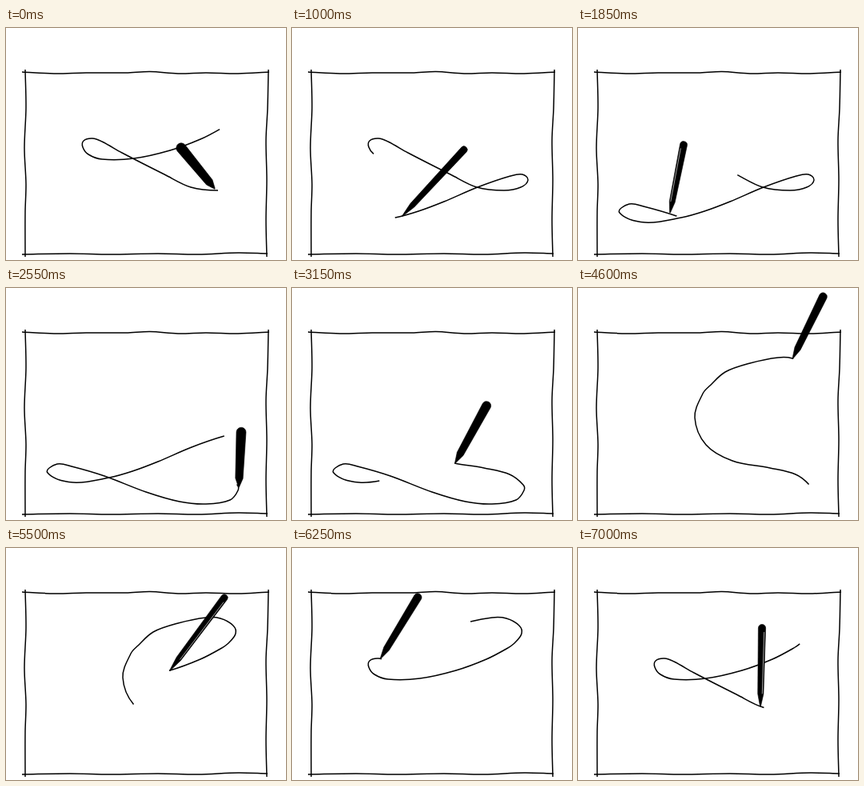
Write an HTML page that moves like this. It is 350 px wide and 290 px high and loops after 7.05 s.

```html
<!DOCTYPE html>
<html lang="en">
<head>
<meta charset="utf-8">
<title>Drawing pen</title>
<style>
html, body { margin: 0; width: 100%; height: 100%; overflow: hidden; background: #fff; }
svg { display: block; width: 350px; height: 290px; }
.line { fill: none; stroke: #000; stroke-width: 1.5; stroke-linejoin: round; }
</style>
</head>
<body>
<svg viewBox="0 0 350 290">
  <g id="border"></g>
  <path id="trail" class="line"/>
  <path id="pen" stroke="#000" stroke-width=".6" stroke-linejoin="round"/>
  <path id="shine" fill="none" stroke="#fff" stroke-width=".8"/>
</svg>
<script>
const LOOP = 7050, STEP = 50, PERIOD = 7080, TRAIL_TIME = 2050;
const el = id => document.getElementById(id);
const trail = el('trail'), pen = el('pen'), shine = el('shine');

// Smooth path through points; a closed one is cut after `count` segments.
function spline(pts, closed, count) {
  const n = pts.length;
  const at = i => closed ? pts[(i + n) % n] : pts[Math.max(0, Math.min(n - 1, i))];
  const segments = count ?? (closed ? n : n - 1);
  let d = 'M' + pts[0];
  for (let i = 0; i < segments; i++) {
    const [a, b, c, e] = [at(i - 1), at(i), at(i + 1), at(i + 2)];
    const k = Math.hypot(c[0] - b[0], c[1] - b[1]) / 3;
    const handle = (p, q, s) => {
      const len = Math.hypot(q[0] - p[0], q[1] - p[1]) || 1;
      return [0, 1].map(j => (q[j] - p[j]) / len * k * s);
    };
    const h1 = handle(a, c, 1), h2 = handle(b, e, -1);
    d += `C${b[0] + h1[0]},${b[1] + h1[1]} ${c[0] + h2[0]},${c[1] + h2[1]} ${c}`;
  }
  return d;
}

// Periodic monotone cubic through [time, value]; `rise` is the gain per period.
function curve(keys, rise = 0) {
  const n = keys.length;
  const key = i => {
    const turn = Math.floor(i / n), [t, v] = keys[i - turn * n];
    return [t + turn * PERIOD, v + turn * rise];
  };
  const slope = i => (key(i + 1)[1] - key(i)[1]) / (key(i + 1)[0] - key(i)[0]);
  const tangent = i => {
    const a = slope(i - 1), b = slope(i);
    return a * b <= 0 ? 0 : 2 * a * b / (a + b);
  };
  return t => {
    let i = t < 0 ? -n : 0;
    while (key(i + 1)[0] <= t) i++;
    const [t0, v0] = key(i), [t1, v1] = key(i + 1), w = t1 - t0, u = (t - t0) / w;
    const s = u * u * (3 - 2 * u);
    return v0 + (v1 - v0) * s
      + w * u * (1 - u) * ((1 - u) * tangent(i) - u * tangent(i + 1));
  };
}

const borders = [
  [[20, 55], [60, 57], [100, 56], [150, 56], [180, 54.5], [215, 57], [250, 56], [290, 57], [329, 55]],
  [[24, 52], [25, 100], [23, 150], [25, 195], [24, 230], [24, 286]],
  [[328, 52], [327, 100], [325, 140], [326, 190], [325, 240], [326, 286]],
  [[20, 283], [80, 282], [130, 283], [190, 282], [240, 283], [290, 281], [327, 282]]
];
el('border').innerHTML = borders.map(b => `<path class="line" d="${spline(b)}"/>`).join('');

const points = [
  [265, 203], [286, 199], [295, 190], [288, 183], [273, 185], [232, 199], [190, 217], [158, 229],
  [129, 237], [84, 243], [52, 231], [64, 220], [82, 223], [123, 235], [175, 255], [217, 267],
  [250, 270], [280, 265], [290, 253], [289, 246], [272, 233], [240, 225], [193, 216], [160, 196],
  [146, 162], [156, 132], [165, 122], [184, 105], [215, 94], [250, 87], [268, 88], [284, 97],
  [287, 107], [278, 119], [268, 126], [243, 139], [205, 153], [160, 163], [120, 164], [103, 158],
  [96, 149], [97, 141], [108, 138], [120, 142], [145, 156], [198, 183], [231, 199]
];
// When the stroke reaches each of these points: [time, point index].
const passes = [
  [0, 0], [500, 4], [1000, 8], [1700, 12], [1850, 13], [2550, 19], [3450, 23], [3750, 26],
  [4950, 33], [5030, 34], [5500, 36], [6030, 39], [6880, 45], [7000, 46]
];
const lengthTo = i => {
  if (!i) return 0;
  trail.setAttribute('d', spline(points, true, i));
  return trail.getTotalLength();
};
const reach = passes.map(([t, i]) => [t, lengthTo(i)]);
trail.setAttribute('d', spline(points, true));
const total = trail.getTotalLength();
const head = curve(reach, total);

// time, tip offset x y, cap offset from tip x y, cap radius, shine side
const poses = [
  [0, -4, -2, -42, -51, 6.2, 0],
  [300, 0, 0, 16, -62, 6, 0],
  [650, 0, 0, 56, -90, 4.8, 0],
  [1000, 9, -2, 77, -83, 4.3, 0],
  [1850, -8, -4, 17, -85, 4.5, -1],
  [2550, 2, 3, 3, -69, 6, 0],
  [2800, 0, 0, 30, -70, 5.8, 0],
  [3000, 0, 0, 40, -75, 5.5, 0],
  [3750, 1, -2, 33, -44, 6.3, 0],
  [4500, 0, 0, 40, -76, 5, 0],
  [4850, 0, 0, 30, -80, 5, 0],
  [5300, 0, 0, 67, -94, 4.5, 1],
  [5500, 0, 0, 68, -91, 4.3, 1],
  [6400, 0, 0, 40, -76, 5, 0],
  [6800, 0, 0, 10, -98, 4.6, 1],
  [7000, -3, -1, 2, -98, 4.6, 1]
];
const pose = [1, 2, 3, 4, 5, 6].map(c => curve(poses.map(p => [p[0], p[c]])));

function drawPen(t, at) {
  const [ox, oy, cx, cy, r, side] = pose.map(f => f(t));
  const x = at.x + ox, y = at.y + oy, len = Math.hypot(cx, cy);
  const ux = cx / len, uy = cy / len;
  const p = (along, across) =>
    `${(x + ux * along - uy * across).toFixed(2)},${(y + uy * along + ux * across).toFixed(2)}`;
  const cone = len * .16, w = r * .78;
  pen.setAttribute('d', `M${p(0, -.4)}L${p(cone, -w)}L${p(len, -r)}` +
    `A${r},${r} 0 0 1 ${p(len, r)}L${p(cone, w)}L${p(0, .4)}Z`);
  shine.setAttribute('d', `M${p(cone, side * w * .55)}L${p(len - 5, side * r * .6)}`);
  shine.setAttribute('opacity', Math.abs(side) * .8);
}

function draw(t) {
  const end = head(t), start = head(t - TRAIL_TIME), len = end - start;
  trail.setAttribute('stroke-dasharray', `${len} ${total - len}`);
  trail.setAttribute('stroke-dashoffset', -start);
  drawPen(t, trail.getPointAtLength((end + total) % total));
}

const began = performance.now();
function tick() {
  const t = (performance.now() - began) % LOOP;
  draw(Math.floor(t / STEP) * STEP);
  requestAnimationFrame(tick);
}
tick();
</script>
</body>
</html>
```
